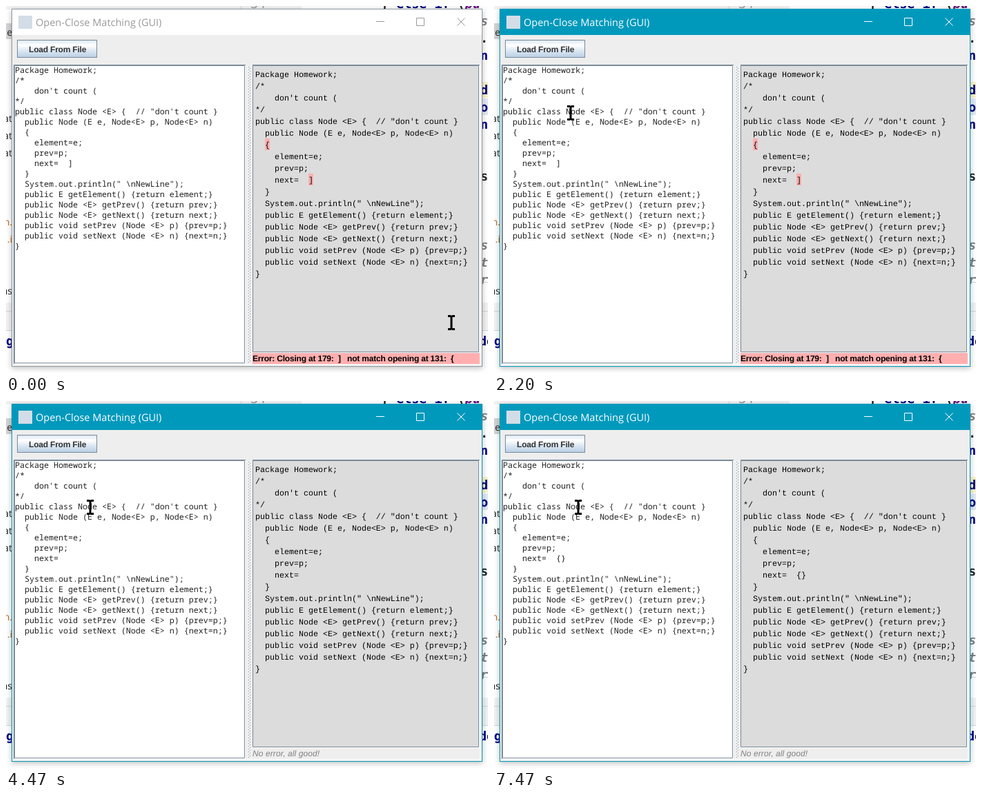
An HTML page for the animation above (8000 ms loop, 698x532 px).

```html
<!DOCTYPE html>
<html lang="en">
<head>
<meta charset="utf-8">
<title>Open-Close Matching</title>
<style>
html, body { margin: 0; width: 100%; height: 100%; overflow: hidden; background: #fff; }
svg { display: block; width: 698px; height: 532px; }
text { white-space: pre; text-rendering: geometricPrecision; }
.ide { font: bold 18.4px "DejaVu Sans Mono", monospace; fill: #000080; }
.note { fill: #808080; font-style: italic; }
.field { fill: #660e7a; font-style: italic; }
.plain { fill: #222; }
.lineno { fill: #999; font-weight: normal; }
.tree { font: 14px "Open Sans", sans-serif; fill: #222; text-anchor: end; }
.changed { fill: #c86414; }
.title { font: 14.5px "Open Sans", "Noto Sans", sans-serif; }
.ui { font: bold 12px "Liberation Sans", Arial, sans-serif; letter-spacing: -.2px; fill: #333; }
.status { fill: #000; }
.status.ok { font-weight: normal; font-style: italic; letter-spacing: .1px; fill: #808080; }
#left { font: 11.67px "Noto Sans Mono", monospace; fill: #222; }
#right { font: 11.67px "Liberation Mono", monospace; fill: #000; }
.edge { fill: none; stroke: #7a8a99; }
.light { fill: none; stroke: #fff; }
#frame { filter: drop-shadow(0 2px 4px rgba(0, 0, 0, .25)); }
</style>
</head>
<body>
<svg viewBox="0 0 698 532">
  <defs>
    <linearGradient id="shine" x2="0" y2="1">
      <stop stop-color="#dde8f3"/><stop offset=".3" stop-color="#fff"/>
      <stop offset=".6" stop-color="#dde8f3"/><stop offset="1" stop-color="#b8cfe5"/>
    </linearGradient>
    <pattern id="bumps" x="350" y="87" width="4" height="4" patternUnits="userSpaceOnUse">
      <path fill="#fff" d="M0 0h1v1h-1zM2 2h1v1h-1z"/>
      <path fill="#7a8a99" d="M1 1h1v1h-1zM3 3h1v1h-1z"/>
    </pattern>
  </defs>

  <!-- editor behind the window -->
  <path fill="#f2f2f2" d="M0 0H428V5H0zM0 430H698V470H0z"/>
  <path fill="#d4d4d4" d="M0 25H9V48H0zM340 0h1v5h-1zM0 442H698v1H0zM0 470H698v1H0zM688 400h10v1h-10z"/>
  <path fill="#fbf3c8" d="M688 110h10v23h-10z"/>
  <path fill="#e2e8f6" d="M688 134h10v24h-10z"/>
  <g class="ide" id="code">
    <text class="lineno" x="354" y="3">34</text>
    <text x="543" y="3"><tspan class="plain">}</tspan> else if <tspan class="plain">(</tspan><tspan class="field">pu</tspan></text>
    <text x="0" y="492">g</text>
    <text x="685" y="492">do</text>
  </g>
  <g class="tree" id="tree"></g>

  <!-- window -->
  <g id="frame"><rect id="bar" x="8.500" y="4.500" width="681" height="518"/></g>
  <rect x="9" y="42" width="680" height="480" fill="#eee"/>
  <rect x="18" y="14" width="20" height="19" fill="#d3dde7"/>
  <text class="title" id="title" x="43" y="29">Open-Close Matching (GUI)</text>
  <path id="buttons" fill="none" d="M536 22.500h12M594.500 17.500h11v11h-11zM653.500 17.500l11 11M664.500 17.500l-11 11"/>
  <rect x="16.500" y="49.500" width="115" height="25" fill="url(#shine)" stroke="#7a8a99"/>
  <text class="ui" x="33" y="67">Load From File</text>

  <!-- split pane: dark lines above and left, light ones below and right -->
  <rect x="12" y="86" width="335" height="433" fill="#fff"/>
  <rect x="357" y="86" width="329" height="417" fill="#dcdcdc"/>
  <path class="edge" d="M11.500 519V85.500H347M357 85.500H686M12.500 86.500h333v431h-333zM357.500 86.500h327v415h-327z"/>
  <path class="light" d="M12 518.500H346.500V86M357 502.500H685.500V86M11 519.500H686.500V85"/>
  <rect x="350" y="87" width="5" height="431" fill="url(#bumps)"/>

  <path id="marks" fill="#ffafaf"/>
  <g id="left"></g>
  <g id="right"></g>
  <rect id="statusBar" x="357" y="503" width="329" height="16"/>
  <text id="status" x="357" y="515"></text>
  <rect id="caret" y="222" width="1" height="15"/>
  <path id="mouse" d="M-5-11h4l1 1 1-1h4v3h-3.500v16h3.500v3h-4l-1-1-1 1h-4v-3h3.500v-16h-3.500z"/>
</svg>
<script>
const $ = id => document.getElementById(id);
const set = (id, name, value) => $(id).setAttribute(name, value);
const LOOP = 8000, FOCUS = 1470, BLINK = 500, TICK = 67, COL = 7, EDIT_ROW = 9;
const source = `Package Homework;
/*
    don't count (
*/
public class Node <E> {  // "don't count }
  public Node (E e, Node<E> p, Node<E> n)
  {
    element=e;
    prev=p;
    next=  
  }
  System.out.println(" \\nNewLine");
  public E getElement() {return element;}
  public Node <E> getPrev() {return prev;}
  public Node <E> getNext() {return next;}
  public void setPrev (Node <E> p) {prev=p;}
  public void setNext (Node <E> n) {next=n;}
}`.split('\n');

// one text element per row
function addRows(id, x, y, step, rows, cls = '') {
  return [...rows].map((row, i) => {
    const el = document.createElementNS('http://www.w3.org/2000/svg', 'text');
    el.setAttribute('x', x);
    el.setAttribute('y', y + step * i);
    el.setAttribute('class', cls);
    el.textContent = row;
    return $(id).appendChild(el);
  });
}

const leftRows = addRows('left', 13, 97, 15, source);
const rightRows = addRows('right', 361, 103, 17, source);

// fragments showing beside the window, on the editor's 25 px rows
const code = (row, chars, cls) => addRows('code', 687, 28 + 25 * row, 25, chars, cls);
const tree = (row, words, cls) => addRows('tree', 9, 43 + 25 * row, 25, words, cls);
code(0, 's', 'note');
code(1, '.', 'plain');
code(2, 'n don');
code(9, 's', 'plain');
code(13, 'str', 'note');
tree(0, ['e']);
tree(5, ['at', 'at', 'at']);
tree(11, ['n.', '.i'], 'changed');
tree(15, ['ns']);

// mouse glides: start time, ticks, from, to
const glides = [
  [130, 3, [645, 459], [603, 545]],
  [1130, 4, [1, 209], [56, 156]],
  [1600, 5, [56, 156], [180, 152]],
  [2070, 7, [180, 152], [40, 158]],
  [2670, 1, [40, 158], [45, 158]],
  [2930, 4, [45, 158], [122, 154]]];

// keys: time, caret column
const keys = [[FOCUS, 14], [2900, 12], [3930, 11], [5470, 12], [6930, 13]];

// edits: time typed, time checked, text, message, marked [row, column]
const GOOD = 'No error, all good!';
const edits = [
  [0, 0, ']', 'Error: Closing at 179:  ]   not match opening at 131:  {', [[6, 2], [9, 11]]],
  [3930, 4000, '', GOOD, []],
  [5470, 5470, '{', 'Error: No closing for opening at 65:  {', [[4, 22]]],
  [6930, 7000, '{}', GOOD, []]];

const latest = (list, t, field = 0) => list.findLast(item => item[field] <= t);

function mouseAt(t) {
  const [start, ticks, from, to] = latest(glides, t) || glides[0];
  const tick = Math.floor((t - start) / TICK) + 1;
  const p = t < start ? 0 : Math.min(1, tick / ticks);
  const eased = 1 - (1 - p) ** 2;
  return from.map((v, i) => Math.round(v + (to[i] - v) * eased));
}

// the caret shows on each key and blinks from there
function caretAt(t) {
  const key = latest(keys, t);
  const shown = key && Math.floor((t - key[0]) / BLINK) % 2 === 0;
  return shown ? 13 + COL * key[1] : -9;
}

function draw(now) {
  const t = now % LOOP, active = t >= FOCUS;
  const ink = active ? '#fff' : '#999';
  set('bar', 'fill', active ? '#0099bc' : '#fff');
  set('bar', 'stroke', active ? '#0099bc' : '#8e9aa3');
  set('title', 'fill', ink);
  set('buttons', 'stroke', ink);
  set('mouse', 'transform', `translate(${mouseAt(t)})`);
  set('caret', 'x', caretAt(t));

  leftRows[EDIT_ROW].textContent = source[EDIT_ROW] + latest(edits, t)[2];
  const [, , tail, message, marks] = latest(edits, t, 1);
  rightRows[EDIT_ROW].textContent = source[EDIT_ROW] + tail;
  set('marks', 'd', marks.map(([r, c]) => `M${361 + COL * c} ${90 + 17 * r}h7v17h-7z`).join(''));
  const ok = message === GOOD;
  set('statusBar', 'fill', ok ? '#eee' : '#ffafaf');
  set('status', 'class', ok ? 'ui status ok' : 'ui status');
  $('status').textContent = message;
  requestAnimationFrame(() => draw(performance.now() - start));
}
const start = performance.now();
draw(0);
</script>
</body>
</html>
```
